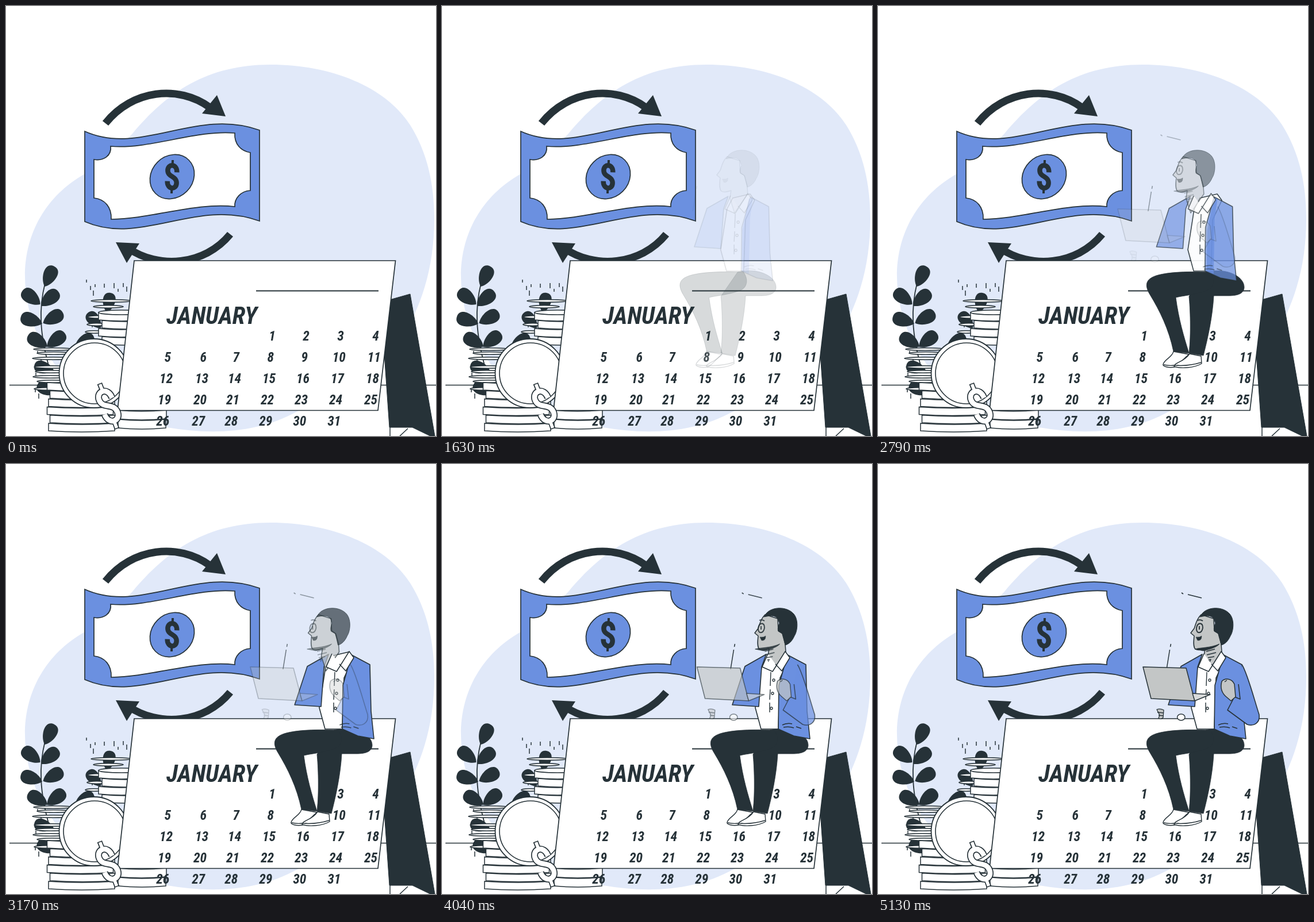
These frames come from a looping animation (748x748 px, 5.18 s). An HTML page with a canvas:

```html
<!DOCTYPE html>
<html lang="en">
<head>
<meta charset="utf-8">
<title>Payment calendar</title>
<style>
html, body { margin: 0; width: 100%; height: 100%; overflow: hidden; background: #fff; }
canvas { display: block; width: 100vw; height: 100vh; }
</style>
</head>
<body>
<canvas id="stage" width="748" height="748"></canvas>
<script>
const SIZE = 748, LOOP = 5180, SHIFT = 100;
const INK = '#263238', BLUE = '#6b90e0', PALE = '#e1e9f9', GRAY = '#c3c6c6', WHITE = '#fff';
const view = document.getElementById('stage').getContext('2d');
const backdrop = document.createElement('canvas');
backdrop.width = backdrop.height = SIZE;
let g = backdrop.getContext('2d');

function shape(d, fill, width = 1.6, stroke = INK) {
  const p = new Path2D(d);
  g.lineWidth = width;
  g.strokeStyle = stroke;
  if (fill) { g.fillStyle = fill; g.fill(p); }
  if (width) g.stroke(p);
}

function oval(x, y, rx, ry, fill, tilt = 0, width = 1.6) {
  g.beginPath();
  g.ellipse(x, y, rx, ry, tilt * Math.PI / 180, 0, Math.PI * 2);
  g.fillStyle = fill;
  g.fill();
  g.lineWidth = width;
  g.strokeStyle = INK;
  if (width) g.stroke();
}

function placed(x, y, tilt, scale, draw) {
  g.save();
  g.translate(x, y);
  g.rotate(tilt * Math.PI / 180);
  g.scale(scale, scale);
  draw();
  g.restore();
}

// Teardrop whose round end points along the tilt.
function leaf(x, y, tilt, scale = 1) {
  placed(x, y, tilt, scale, () => shape('M-21 0C-11-13 18-19 18 0C18 19-11 13-21 0Z', INK, 0));
}

function dollar(x, y, tilt, scale, color, weight, bar) {
  placed(x, y, tilt, scale, () => {
    const tip = 27 + bar / 2;
    shape('M8-8C8-23-8-23-8-11C-8 1 8-2 8 11C8 23-8 23-8 8', null, weight, color);
    shape(`M0 ${-tip}V-20M0 20V${tip}`, null, bar, color);
  });
}

function coin(x, y, w, h = 14) {
  shape(`M${x} ${y}V${y + h - 1}Q${x + w / 2} ${y + h + 3} ${x + w} ${y + h - 1}V${y}Q${x + w / 2} ${y + 4} ${x} ${y}Z`, WHITE, 1.5);
}

function face(size) {
  return `italic bold condensed ${size}px "Roboto Condensed", Roboto, sans-serif`;
}

// Largest size up to max at which the sample stays inside the room given.
function fitSize(sample, max, room) {
  g.font = face(max);
  return Math.min(max, max * room / g.measureText(sample).width);
}

function scenery() {
  g.fillStyle = WHITE;
  g.fillRect(0, 0, SIZE, SIZE);
  shape('M33 470C33 395 70 330 137 292C175 268 195 248 220 222C280 150 350 102 460 102C565 102 660 140 703 207C733 255 745 310 745 370C745 460 720 525 690 575C640 645 570 675 505 706C440 742 360 747 280 733C220 720 165 695 130 668C65 620 33 540 33 470Z', PALE, 0);
  shape('M6 659.5H748', null, 1.6);
}

function plants() {
  shape('M68 482C57 525 58 570 76 632', null, 1.8);
  [[76, 469, -65], [43, 506, 218], [77, 508, -40], [43, 546, 198], [83, 542, -28], [54, 582, 210], [88, 580, -38]]
    .forEach(a => leaf(...a));
  [[179, 515, -80], [153, 546, 230], [138, 582, -25], [65, 629, 195], [69, 666, 210]]
    .forEach(a => leaf(...a, 0.9));
}

function coins() {
  const ticks = [[140, 476], [147, 487], [152, 495], [155, 484], [171, 483], [188, 482], [195, 492], [204, 482], [210, 488],
    [146, 538], [150, 552], [143, 566], [55, 600], [61, 614], [52, 638], [58, 652], [51, 665], [57, 674]];
  ticks.forEach(([x, y], i) => shape(`M${x} ${y}v${5 + i % 3 * 2}`, null, 1.5));
  [[82, 597, 34], [83, 604, 29], [82, 613, 36], [80, 628, 31], [78, 636, 27], [77, 645, 30], [80, 653, 26], [71, 666, 22],
    [183, 513, 35], [178, 523, 26], [160, 541, 18], [158, 554, 17], [153, 567, 15]]
    .forEach(([x, y, r]) => oval(x, y, r, 2.2, WHITE));
  for (let i = 3; i >= 0; i--) coin(161 + i % 2 * 6, 533 + i * 14, 80);
  oval(201, 533, 40, 4, WHITE);
  coin(192, 703, 87, 16);
  coin(195, 719, 83, 16);
  for (let i = 5; i >= 0; i--) coin(74 + (i * 2 % 3 - 1) * 2.5, 655 + i * 14.2, 115);
  oval(153, 639, 60.5, 60, WHITE, 0, 1.8);
  oval(154, 639, 54, 53, WHITE, 0, 1.6);
}

function banknote() {
  shape('M173 204C220 145 300 137 354 176', null, 13);
  shape('M367 155L382 192L341 187Z', INK, 0);
  shape('M390 397C345 452 265 458 212 421', null, 13);
  shape('M191 411L232 413L210 447Z', INK, 0);
  shape('M137 218C235 262 330 176 441 216V374C330 334 235 418 137 375Z', BLUE, 1.7);
  shape('M153 267C170 270 184 260 182 244C250 250 330 215 398 221C397 240 408 252 425 255V321C408 322 397 335 398 349C330 341 255 370 183 371C184 350 172 336 153 334Z', WHITE, 1.7);
  oval(289, 297, 41, 36, BLUE, -45, 1.7);
  dollar(289, 297, 2, 1, INK, 8.5, 4);
}

function calendar() {
  shape('M664 512L703 501L746 748H738L707 733H667L657 590Z', INK, 1);
  shape('M668 733V748M685 748L699 735', null, 1.5);
  shape('M223 443H677.5L647 703.5H194Z', WHITE, 1.7);
  shape('M435 495.5H648', null, 1.8);
  g.fillStyle = INK;
  const title = fitSize('JANUARY', 45, 158);
  g.font = face(title);
  const gap = (158 - g.measureText('JANUARY').width) / 7;
  g.letterSpacing = gap + 'px';
  g.fillText('JANUARY', 279, 538 + title * 0.357);
  g.letterSpacing = '0px';
  const size = fitSize('20', 24, 23);
  g.font = face(size);
  g.textAlign = 'center';
  const cols = [284, 346, 403, 463, 522, 582, 643];
  for (let day = 1; day <= 31; day++) {
    const cell = day + 2, row = Math.floor(cell / 7);
    g.fillText(day, cols[cell % 7] - row * 2.8, 574 + row * 36.8 + size * 0.357);
  }
  dollar(178, 696, -21, 1.4, INK, 8.6, 6.4);
  dollar(178, 696, -21, 1.4, WHITE, 6.2, 4);
}

// Each part: arrival time, fill, line width, path.
const parts = [
  [2720, INK, 0.8, 'M570 463C605 454 637 470 637 489C637 500 626 504 610 504H584C582 540 574 577 566 608L541 604C545 570 543 525 541 505Z'],
  [2630, INK, 0.8, 'M484 469C500 464 530 461 578 463C587 476 584 489 574 494C555 502 530 504 518 507C523 545 532 575 541 604L514 601C506 562 490 530 473 502C463 485 466 475 484 469Z'],
  [2650, WHITE, 1.4, 'M514 601L541 606C532 612 524 625 516 628C506 630 494 627 496 623C500 613 511 612 514 601ZM497 624Q506 626 515 625'],
  [2680, WHITE, 1.4, 'M542 605L562 609L563 622C550 630 526 631 515 627C515 620 532 620 542 605ZM516 625Q540 627 562 620'],
  [2900, WHITE, 1.6, 'M566 334L596 327L604 338L588 372L585 461H555L545 424L556 353Z'],
  [2980, null, 1.4, 'M572 362L571 386M571 392L570 410M570 415V432'],
  [2980, WHITE, 1.3, 'M579 376a2 2 0 1 0-4 0a2 2 0 1 0 4 0M577 399a2 2 0 1 0-4 0a2 2 0 1 0 4 0M575 425a2 2 0 1 0-4 0a2 2 0 1 0 4 0'],
  [3230, BLUE, 1.6, 'M564 331L527 352L505 419L551 422L556 353Z'],
  [3050, BLUE, 0, 'M586 390L597 335L604 334L599 370L597 466L585 461Z'],
  [3120, BLUE, 1.6, 'M601 332L633 349L635 430L640 478L612 473L585 461L586 385Z'],
  [3450, null, 1.5, 'M592 454Q600 450 609 452M594 458Q604 456 612 459M616 457L625 460'],
  [3700, GRAY, 1.5, 'M562 262C553 271 553 279 550 286L544 294L550 299C549 308 548 318 552 322C558 326 566 322 569 321L567 334L575 360L598 327L597 313L592 295L585 290L584 269Z'],
  [3750, INK, 1, 'M564 260C574 248 600 247 612 261C621 272 618 292 613 299C609 309 602 314 597 315C595 306 594 301 592 295L585 291C583 285 586 279 587 277L584 269C578 262 570 264 560 266Z'],
  [3150, WHITE, 1.5, 'M567 330L557 353L575 361L597 326L605 337L591 360L580 348'],
  [3780, null, 1.5, 'M509.500 313L508.500 318M507.500 323L502 357'],
  [3850, INK, 0.5, 'M553 301Q560 302 563 299Q563 308 556 307Z'],
  [4200, null, 1.8, 'M565 285c0-10-9-10-11 0c-1 11 9 11 11 0ZM559 282v6M556 272Q561 270 565 273'],
  [4300, INK, 0.8, 'M551 322C562 319 578 320 594 313C588 320 574 323 566 325Z'],
  [4450, null, 1.4, 'M571 326L586 322M572 332L588 328M574 337L585 335M575 341L579 340L577 344'],
  [4300, null, 1.6, 'M528 224L531 226M539 227L563 233'],
  [4700, BLUE, 1.6, 'M633 349C642 362 654 408 663 436C665 451 653 457 642 453L608 428L620 405L630 409L627 383'],
  [4690, GRAY, 1.5, 'M598 378C605 371 616 374 620 383L622 405L614 412L607 406C598 399 595 389 598 378ZM603 379L607 376'],
  [4850, GRAY, 1.5, 'M461 353L536 355L551 412L475 408Z'],
  [4850, '#d9dbdb', 1.4, 'M547 399L578 401L551 412Z'],
  [5000, WHITE, 1.4, 'M534 440.500a6.700 5.500 0 1 0-13.400 0a6.700 5.500 0 1 0 13.400 0'],
  [5130, GRAY, 1.3, 'M485 427Q491 425 497 428L496 441Q493 445 488 442L490 437ZM486 432L497 433M488 437L496 438']
];

const clamp = (v, low, high) => Math.min(high, Math.max(low, v));

// Late parts drift more evenly and begin to show later.
function drawPart([end, fill, width, d], t) {
  const ease = clamp(1.6 - (end - 3200) / 1800, 1.05, 1.6);
  const p = Math.pow(Math.min(1, t / end), ease);
  const span = Math.min(2600, end * 0.7);
  const shown = clamp(1 - (end - t) / span, 0, 1);
  if (!shown) return;
  g.save();
  g.globalAlpha = Math.pow(shown, clamp(2.2 - (end - 2630) / 2000, 1.2, 2.2));
  g.translate((p - 1) * SHIFT, 0);
  shape(d, fill, width);
  g.restore();
}

[scenery, plants, coins, banknote, calendar].forEach(f => f());
g = view;
g.lineJoin = 'round';

function frame(now) {
  const t = now % LOOP;
  g.drawImage(backdrop, 0, 0);
  parts.forEach(part => drawPart(part, t));
  requestAnimationFrame(frame);
}
requestAnimationFrame(frame);
</script>
</body>
</html>
```
